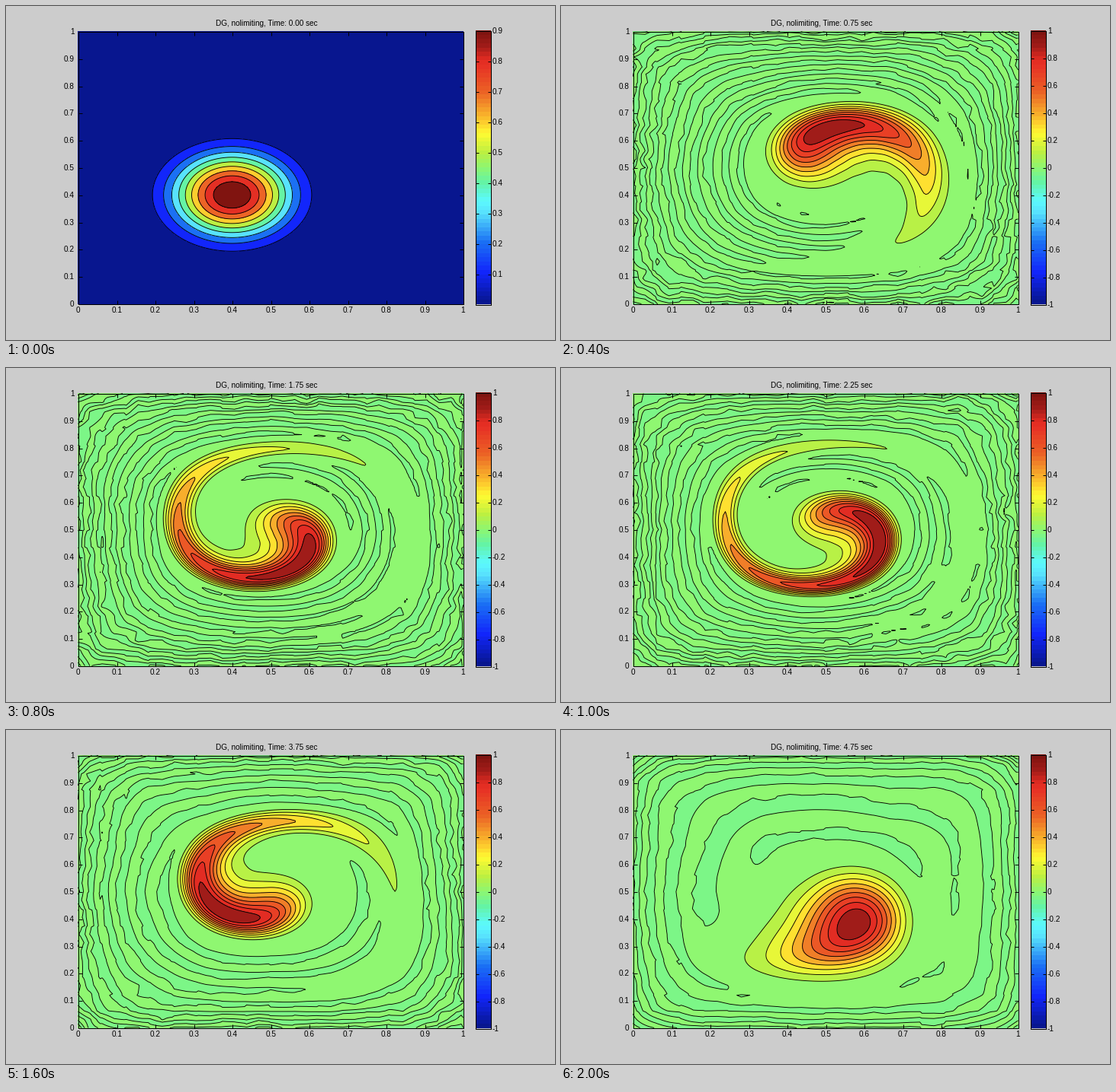
Recreate the animation shown at these times as a matplotlib script. Size 720 px wide and 439 px high, loop 2100 ms.

```python
import numpy as np
import matplotlib.pyplot as plt
from matplotlib.animation import FuncAnimation
from matplotlib.colors import LinearSegmentedColormap

W, H, DPI = 720, 439, 64
PX = 72 / DPI
LEFT, RIGHT, TOP, BOTTOM = 94.5, 599.5, 33.5, 391.5
BAR_L, BAR_R, BAR_T, BAR_B = 615.5, 635.5, 32.5, 392.5
PERIOD = 5.0
CELLS = 16

plt.rcParams.update({"font.family": "Liberation Sans", "font.size": 10 * PX})

STOPS = [
    (0, 8, 22, 143), (.111, 18, 38, 252), (.222, 27, 112, 244),
    (.333, 88, 226, 253), (.375, 92, 250, 254), (.444, 100, 244, 166),
    (.5, 143, 247, 113), (.555, 188, 240, 66), (.625, 255, 251, 50),
    (.667, 253, 205, 46), (.778, 236, 100, 38), (.875, 231, 50, 37),
    (.9, 226, 44, 35), (.95, 160, 28, 25), (1, 128, 20, 16),
]
jet = LinearSegmentedColormap.from_list(
    "soft_jet", [(p, (r / 255, g / 255, b / 255)) for p, r, g, b in STOPS], 1024)
NEGATIVE = (124 / 255, 246 / 255, 135 / 255)

# Grid and geometry shared by all steps
axis = np.linspace(0, 1, CELLS * 12 + 1)
gx, gy = np.meshgrid(axis, axis)
px = LEFT + gx * (RIGHT - LEFT)
py = BOTTOM - gy * (BOTTOM - TOP)
rho = np.arccos(np.clip(np.sin(np.pi * gx) * np.sin(np.pi * gy), 0, 1)) / np.pi
theta = np.arctan2(gy - .5, gx - .5)
wall_x = np.minimum(gx, 1 - gx)
wall_y = np.minimum(gy, 1 - gy)
col, row = (gx * CELLS).astype(int), (gy * CELLS).astype(int)


def velocity(x, y):
    return (np.sin(np.pi * x) ** 2 * np.sin(2 * np.pi * y),
            -np.sin(np.pi * y) ** 2 * np.sin(2 * np.pi * x))


def bump(x, y):
    r = np.minimum(np.hypot(x - .4, y - .4) * 3, 1)
    return np.cos(np.pi * r / 2) ** 4


def advected(t, steps=30):
    """Trace the swirling flow back to the initial bump (RK4)."""
    h = -PERIOD / np.pi * np.sin(np.pi * t / PERIOD) / steps
    x, y = gx, gy
    for _ in range(steps):
        a, b = velocity(x, y)
        c, d = velocity(x + h / 2 * a, y + h / 2 * b)
        e, f = velocity(x + h / 2 * c, y + h / 2 * d)
        p, q = velocity(x + h * e, y + h * f)
        x = x + h / 6 * (a + 2 * c + 2 * e + p)
        y = y + h / 6 * (b + 2 * d + 2 * f + q)
    return bump(x, y)


def lattice(rng, m):
    """Bilinear random field with m knots per side."""
    g = rng.standard_normal((m + 2, m + 2))
    i, j = (gx * m).astype(int), (gy * m).astype(int)
    u, v = gx * m - i, gy * m - j
    low = g[j, i] * (1 - u) + g[j, i + 1] * u
    high = g[j + 1, i] * (1 - u) + g[j + 1, i + 1] * u
    return low * (1 - v) + high * v


def ripples(t, step):
    """Tiny oscillations: rings along the flow, ragged near the walls."""
    rng = np.random.default_rng(40 + step)
    coarse, fine = lattice(rng, 6), lattice(rng, 32)
    col_jump, row_jump = rng.standard_normal((2, CELLS + 1))
    cell = rng.standard_normal((CELLS + 1, CELLS + 1))[row, col]
    rings = np.interp(t, [2.25, 3.25, 4.25, 4.75], [23, 18, 12, 7])
    rough = np.interp(t, [2.25, 4.75], [1, .5])
    reach = .05 + .04 * rough
    edge_x, edge_y = np.exp(-wall_x / reach), np.exp(-wall_y / reach)
    edge = edge_x + edge_y
    phase = (2 * np.pi * rings * rho + theta + .8 * coarse + 14 * edge
             + rough * (.15 + edge) * (1.3 * fine + .5 * cell)
             + rough * (edge_x * col_jump[col] + edge_y * row_jump[row]))
    calm = 1.6 / (1 + np.exp((rho - .2) / .02))
    wake = 1.2 * np.exp(-((rho - .36) / .05) ** 2) * np.maximum(0, np.cos(theta + .4))
    return np.sin(phase) + rough * (.2 * fine + .15 * cell) + calm + wake


fig = plt.figure(figsize=(W / DPI, H / DPI), dpi=DPI, facecolor="#cccccc")
ax = fig.add_axes([0, 0, 1, 1])
ax.axis("off")


def line(xs, ys):
    return ax.plot(xs, ys, color="k", lw=PX, zorder=5, solid_capstyle="butt")


def box(l, t, r, b):
    line([l, r, r, l, l], [t, t, b, b, t])


def label(x, y, s, ha):
    return ax.text(x, y, s, ha=ha, va="baseline", zorder=6)


def snap(v):
    return np.floor(v) + .5


bands = jet(np.linspace(0, 1, 64))[:, None, :]
ax.imshow(bands, extent=(BAR_L, BAR_R, BAR_B, BAR_T), origin="lower",
          aspect="auto", interpolation="nearest", zorder=3)
ax.set_xlim(0, W)
ax.set_ylim(H, 0)
ax.autoscale(False)

box(LEFT, TOP, RIGHT, BOTTOM)
box(BAR_L, BAR_T, BAR_R, BAR_B)
for k in range(11):
    x = snap(LEFT + k * (RIGHT - LEFT) / 10)
    y = snap(BOTTOM - k * (BOTTOM - TOP) / 10)
    line([x, x], [TOP, TOP + 5])
    line([x, x], [BOTTOM, BOTTOM - 5])
    line([LEFT, LEFT + 5], [y, y])
    line([RIGHT, RIGHT - 5], [y, y])
    label(x, 403, f"{k / 10:g}", "center")
    label(89.5, y + 3.5, f"{k / 10:g}", "right")


def scale(lo, hi, ticks):
    """Colour bar ticks and labels for one value range."""
    parts = []
    for v in ticks:
        y = snap(BAR_B - (v - lo) / (hi - lo) * (BAR_B - BAR_T))
        parts += line([BAR_L, BAR_L + 4], [y, y])
        parts += line([BAR_R, BAR_R - 4], [y, y])
        parts.append(label(638, y + 3.5, f"{v:g}", "left"))
    return parts


first_scale = scale(0, .9, [k / 10 for k in range(1, 10)])
later_scale = scale(-1, 1, [k / 5 for k in range(-5, 6)])
title = label(342, 26, "", "center")
levels = np.arange(1, 10) / 10
shown = []


def draw(i):
    # The picture rests for two ticks at the start and at 3.75 sec
    step = 15 if i == 17 else max(0, i - 1)
    t = step * .25
    while shown:
        shown.pop().remove()
    if step:
        z = advected(t) + .002 * ripples(t, step)
        lines = [0, *levels]
        colors = [NEGATIVE] + [jet((v + 1) / 2) for v in lines]
    else:
        z = bump(gx, gy)
        lines = list(levels)
        colors = [jet(0.)] + [jet(v / .9) for v in lines]
    shown.append(ax.contourf(px, py, z, levels=[-1, *lines, 2],
                             colors=colors, antialiased=False, zorder=1))
    shown.append(ax.contour(px, py, z, levels=lines, colors="k",
                            linewidths=.9 * PX, linestyles="solid", zorder=2))
    title.set_text(f"DG, nolimiting, Time: {t:.2f} sec")
    for part in first_scale:
        part.set_visible(step == 0)
    for part in later_scale:
        part.set_visible(step > 0)
    return []


anim = FuncAnimation(fig, draw, frames=21, interval=100, repeat=True,
                     repeat_delay=0, blit=False)
plt.show()
```
